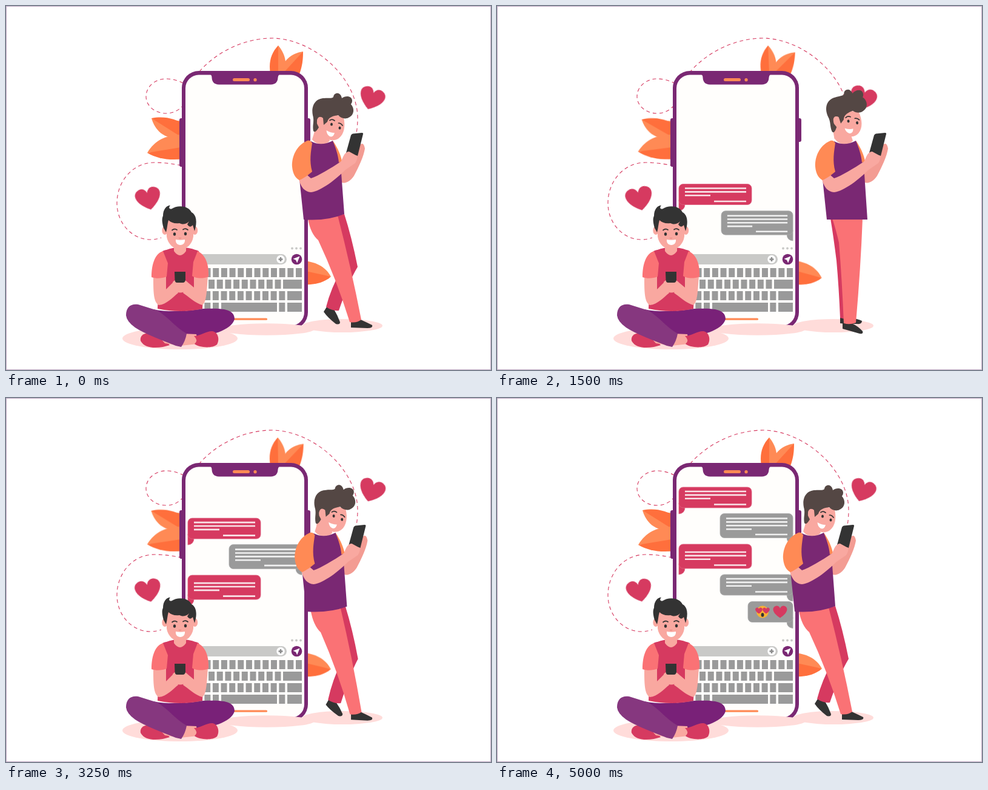
Write an HTML page that moves like this. It is 800 px wide and 600 px high and loops after 5.04 s.

```html
<!DOCTYPE html>
<html lang="en">
<head>
<meta charset="utf-8">
<title>Chat</title>
<style>
html, body { margin: 0; width: 100%; height: 100%; overflow: hidden; background: #fff; }
svg { display: block; width: 800px; height: 600px; }
.purple { fill: #7a2873; } .plum { fill: #86377f; } .crimson { fill: #d63a60; }
.coral { fill: #fa7275; } .skin { fill: #f9a8a0; } .shade { fill: #f39c93; }
.light { fill: #ff8a55; } .deep { fill: #ff6f3c; } .dark { fill: #333; }
.curls { fill: #544744; } .grey { fill: #9a9a9a; } .white { fill: #fff; } .floor { fill: #ffdcda; }
.line { fill: none; stroke: #333; stroke-width: 1.7; stroke-linecap: round; }
.dash { fill: none; stroke: #d63a60; stroke-width: 1.1; stroke-dasharray: 6 5; animation: flow 5.04s linear infinite; }
@keyframes flow { to { stroke-dashoffset: -66; } }
.leaf { animation: sway .504s ease-in-out infinite alternate; }
@keyframes sway { to { transform: rotate(var(--turn)); } }
.beat { animation: beat .42s cubic-bezier(.364, 0, .636, 1) infinite alternate; }
@keyframes beat { to { transform: scale(1.15); } }
.text { fill: none; stroke: #fff; stroke-opacity: .85; stroke-width: 2.6; }
</style>
</head>
<body>
<svg viewBox="0 0 800 600">
  <defs>
    <path id="heart" d="M0 18C-25 3-26-15-11-18C-5-19-1-14 0-10C1-14 5-19 11-18C26-15 25 3 0 18Z"/>
    <clipPath id="cut"><rect x="280" y="100" width="230" height="427"/></clipPath>
  </defs>
  <rect x=".5" y=".5" width="799" height="599" fill="#fff" stroke="#bda6c1"/>

  <g class="dash">
    <path d="M319 108C345 78 390 53 440 53C510 55 580 120 580 185C580 200 578 212 575 222"/>
    <path d="M292 127C283 122 272 120 264 120C246 120 231 133 231 149C231 165 246 177 264 177C275 177 283 173 290 166"/>
    <path d="M289 263C275 260 260 258 245 258C208 258 183 290 183 325C183 358 208 385 238 385C245 385 250 384 256 382"/>
  </g>

  <g class="leaf" style="--turn:-2.4deg; transform-origin:290px 218px">
    <path class="light" d="M240 185C246 205 260 221 294 219V190Z"/>
    <path class="deep" d="M240 185C262 181 280 186 294 196V219Z"/>
  </g>
  <g class="leaf" style="--turn:2deg; transform-origin:290px 230px">
    <path class="light" d="M233 242C245 222 262 212 294 212V236Z"/>
    <path class="deep" d="M233 242L294 232V252C270 255 250 252 233 242Z"/>
  </g>
  <g class="leaf" style="--turn:-2.4deg; transform-origin:448px 110px">
    <path class="deep" d="M449 65C437 78 433 92 436 112H452Z"/>
    <path class="light" d="M449 65C460 78 465 95 458 112H449Z"/>
  </g>
  <g class="leaf" style="--turn:2.8deg; transform-origin:466px 112px">
    <path class="light" d="M490 75C470 78 456 90 452 112H464Z"/>
    <path class="deep" d="M490 75C490 88 489 98 484 112H456Z"/>
  </g>
  <g class="leaf" style="--turn:3deg; transform-origin:495px 440px">
    <path class="deep" d="M490 431L536 446C525 456 510 460 490 459Z"/>
    <path class="light" d="M490 420C515 422 528 432 536 446L490 436Z"/>
  </g>

  <g clip-path="url(#cut)">
    <rect class="purple" x="286" y="185" width="10" height="80" rx="3"/>
    <rect class="purple" x="492" y="185" width="10" height="39" rx="3"/>
    <rect class="purple" x="290" y="107" width="208" height="426" rx="28"/>
    <rect x="296" y="113.500" width="196" height="413.500" rx="22" fill="#fffefc"/>
    <rect x="296" y="480" width="178" height="47" fill="#fffefc"/>
    <path class="purple" d="M335 112Q339.500 113 339.500 118Q340 129 351 129.500H437Q448 129 448.500 118Q449 113 453 112Z"/>
    <rect class="light" x="374" y="119" width="28" height="5" rx="2.500"/>
    <circle class="light" cx="411" cy="121.700" r="2.600"/>
  </g>
  <g fill="#c9c9c7">
    <circle cx="472" cy="399.500" r="1.900"/><circle cx="479" cy="399.500" r="1.900"/><circle cx="486" cy="399.500" r="1.900"/>
    <rect x="302" y="409" width="161" height="17" rx="8.500"/>
  </g>
  <circle class="white" cx="453" cy="417.500" r="6.700"/>
  <path d="M449.500 417.500h7M453 414v7" stroke="#8c8c8c" stroke-width="2.600"/>
  <circle class="purple" cx="479.500" cy="417.500" r="8.800"/>
  <path class="white" d="M484.500 412.500L473.500 416.800L478 418.800L480.200 423.500Z"/>
  <g id="keys" class="grey"></g>
  <rect class="light" x="350" y="514.500" width="81" height="3.300" rx="1.600"/>
  <g id="chat"></g>

  <g class="floor">
    <ellipse cx="430" cy="533" rx="78" ry="9.700"/>
    <ellipse cx="555" cy="527" rx="66" ry="11"/>
    <ellipse cx="287" cy="548" rx="95" ry="18"/>
  </g>

  <g transform="translate(603 153) rotate(19)"><use href="#heart" class="crimson beat"/></g>
  <g transform="translate(235 318) rotate(-13)"><use href="#heart" class="crimson beat"/></g>

  <!-- standing man -->
  <g id="legs"></g>
  <g id="upper">
    <path class="shade" d="M552 272L566 262L580 235C584 226 590 223 592 235C590 248 582 265 574 280C566 292 555 294 552 289Z"/>
    <path class="skin" d="M511 200L505 220C512 230 528 230 534 222L528 205Z"/>
    <path id="shirt" class="purple"/>
    <path class="light" d="M539 222C548 235 553 248 554 256L549 258C548 245 543 232 539 222Z"/>
    <path class="dark" d="M572 210.500L587 209Q589.500 209 589 211L580 247L561 242L569 213Q570 211 572 210.500Z"/>
    <path class="skin" d="M483 286C487 300 493 306 503 307C520 305 545 285 560 270L576 259C581 251 580 246 577 246L566 240C559 240 556 248 553 256C535 268 515 280 503 284L496 278Z"/>
    <path class="light" d="M497 222C478 230 471 250 472 265C473 277 478 284 484 287C492 284 500 277 505 273C500 255 503 240 505 226C503 222 500 221 497 222Z"/>
  </g>
  <g id="head">
    <path class="skin" d="M510 188L508 218C514 226 526 227 531 222L530 200Z"/>
    <path class="skin" d="M514 184L530 174L557 184C560 198 558 211 549 218C541 224 530 221 524 215L517 196Z"/>
    <path class="curls" d="M507 206C505 196 509 190 506 180C503 165 510 152 525 152C532 151 537 153 540 150C541 142 552 141 554 152C560 147 571 148 571 156C571 160 569 161 569 162C575 168 575 180 565 184C560 187 552 185 548 180C540 181 532 183 530 191L524 196L523 185C518 180 512 185 513 194L516 200C512 207 509 209 507 206Z"/>
    <ellipse class="skin" cx="518" cy="189.500" rx="5" ry="6.800"/>
    <g class="dark"><ellipse cx="537" cy="195" rx="2" ry="2.500"/><ellipse cx="550.500" cy="201" rx="2" ry="2.500"/></g>
    <path class="line" d="M534 188.500q4-3 8 .5M548.500 193q4 0 6.500 4"/>
    <path class="white" d="M528.500 205Q536 209.500 542 209Q540 217 534 215Q529 212 528.500 205Z"/>
  </g>

  <!-- sitting man -->
  <path class="crimson" d="M222 552C220 542 230 537 240 540L262 550L270 559C255 564 230 567 222 552Z"/>
  <path class="skin" d="M255 548L272 550L275 558L262 556Z"/>
  <path d="M243 500C270 506 310 502 325 499C345 499 377 496 377 516C372 535 335 544 312 546L262 553L245 530Z" fill="#792178"/>
  <g id="foot">
    <path class="skin" d="M290 540L314 541L316 557L288 560Z"/>
    <path class="crimson" d="M310 544C320 544 330 536 340 536C350 537 353 550 348 558C340 565 318 563 311 557Q318 551 310 544Z"/>
  </g>
  <path class="plum" d="M198 510C198 496 206 490 218 492L250 502C270 515 280 530 298 540Q296 552 289 562L280 560C255 550 228 540 213 530Q199 520 198 510Z"/>
  <path class="crimson" d="M258 404C270 400 276 398 288 398C300 398 308 400 318 404L327 440L324 499Q288 507 250 499L252 450Z"/>
  <path class="skin" d="M243 445C243 470 243 488 252 493C265 492 275 480 284 473L276 455L264 467V445ZM333 445C331 470 331 488 324 493C312 490 300 478 292 473L298 454L310 464V445Z"/>
  <path class="coral" d="M259 404C246 408 240 425 240 447C248 450 258 449 265 446L267 424ZM316 404C329 410 335 425 334 446C325 450 312 449 307 445L309 422Z"/>
  <path class="skin" d="M275 455Q280 449 287 452Q294 449 299 455L299 467Q288 478 275 467Z"/>
  <path class="dark" d="M278 438H296V452Q295 456 292 456H282Q279 456 278.500 452Z"/>
  <path class="skin" d="M277 388V404Q287 418 297 404V388Z"/>
  <g id="face">
    <g class="skin">
      <ellipse cx="262" cy="370" rx="4.700" ry="7"/><ellipse cx="311.500" cy="370" rx="4.700" ry="7"/>
      <path d="M265 352H309V380C307 393 298 401 287 401C277 401 267 393 265 380Z"/>
    </g>
    <path class="dark" d="M260 366C257 356 257 350 259 346C259 336 264 329 271 328.500C268 332 269 335 273 334.500C283 327.500 301 329 306 340C314 344 316 356 311 371L308 361C304 366 301 363 299 360L302 355C296 361 290 360 286 358C278 359 272 357 268 353C266 360 266 366 264 373Z"/>
    <g class="dark"><ellipse cx="278" cy="376" rx="2.200" ry="2.800"/><ellipse cx="296" cy="375.500" rx="2.200" ry="2.800"/></g>
    <path class="line" d="M274 369.500q4-3.500 8-.5M292 368.500q4-3 8 .5"/>
    <path d="M285 382q2 1.500 4 0" fill="none" stroke="#e98b85" stroke-width="1.300"/>
    <path id="smile" class="white" d="M-7.500-4.500Q0-3 7.500-4.500C8 1 5 4.500 0 4.500C-5 4.500-8 1-7.500-4.500Z"/>
  </g>
</svg>
<script>
const LOOP = 5040;
const NS = 'http://www.w3.org/2000/svg';
const $ = id => document.getElementById(id);

function add(parent, tag, attrs) {
  const el = document.createElementNS(NS, tag);
  for (const key in attrs) el.setAttribute(key, attrs[key]);
  return parent.appendChild(el);
}

const smooth = (t, from, to) => {
  const u = Math.min(1, Math.max(0, (t - from) / (to - from)));
  return u * u * (3 - 2 * u);
};

// Blend two paths that share the same commands.
function mix(a, b, p) {
  const ends = b.match(/[\d.]+/g);
  let i = 0;
  return a.replace(/[\d.]+/g, n => (+n + (ends[i++] - n) * p).toFixed(2));
}

// Keyboard
const key = (x, row, w) => add($('keys'), 'rect', { x, y: 432 + row * 19, width: w, height: 15 });
const keyRun = (x, row, count) => {
  for (let i = 0; i < count; i++) key(x - i * 13.68, row, 10);
};
keyRun(478, 0, 13);
keyRun(443.500, 1, 10); key(457, 1, 31);
keyRun(450.300, 2, 11); key(464, 2, 24);
keyRun(450.300, 3, 1); keyRun(341, 3, 3); key(355, 3, 92); key(464, 3, 24);

// Messages: final top, height, first text line, number of full lines, pop time
const messages = [
  { y: 147, h: 34, first: 7, full: 2, pop: 250, mine: false },
  { y: 190.500, h: 40, first: 8, full: 3, pop: 1224, mine: true },
  { y: 241, h: 40, first: 13, full: 2, pop: 2160, mine: false },
  { y: 291, h: 34, first: 7, full: 2, pop: 3340, mine: true },
  { y: 335.500, h: 34, emoji: true, pop: 4260, mine: true }
];
const lifts = [0, 50.500, 49.500, 49, 48];

for (const m of messages) {
  const w = m.emoji ? 74 : 120;
  const left = m.mine ? -w : 0;
  const top = -m.h - 10;
  m.el = add($('chat'), 'g', {});
  const body = add(m.el, 'g', {
    class: m.mine ? 'grey' : 'crimson', stroke: m.mine ? '#aaa' : '#df6380', 'stroke-width': 0.8
  });
  add(body, 'path', { d: m.mine ? 'M0-18V0Q-10-1-10-11V-18Z' : 'M0-18V0Q10-1 10-11V-18Z' });
  add(body, 'rect', { x: left, y: top, width: w, height: m.h, rx: 7 });
  if (m.emoji) {
    const mid = top + 17;
    const heart = (x, y, s) => add(m.el, 'use', {
      href: '#heart', class: 'crimson', transform: `translate(${x} ${y}) scale(${s})`
    });
    add(m.el, 'circle', { cx: -50, cy: mid, r: 10, fill: '#f8b133' });
    heart(-56, mid - 2, 0.28);
    heart(-44, mid - 2, 0.28);
    add(m.el, 'ellipse', { cx: -50, cy: mid + 5, rx: 2.4, ry: 3.2, class: 'dark' });
    heart(-21, mid, 0.55);
    continue;
  }
  const x = left + 10;
  let d = '';
  for (let i = 0; i <= m.full; i++) d += `M${x} ${top + m.first + i * 5.9}h${i < m.full ? 101 : 42}`;
  d += `M${x + 48} ${top + m.h - 5.5}h53`;
  add(m.el, 'path', { d, class: 'text' });
}

// Legs: leaning and upright shapes, back to front
const legs = [
  ['dark', 'M529 496L541 500Q547 510 551 521Q551 526 544 524Q530 513 524 504Z',
           'M566 514L580 514Q594 515 602 519Q602 525 594 524Q575 524 566 523Z'],
  ['crimson', 'M520 350L558 343Q570 380 580 430Q565 455 549 502Q538 503 528 496Q536 465 553 435Q545 400 520 350Z',
              'M550 350L580 350Q590 400 588 430Q588 470 588 515Q578 518 566 514Q564 465 560 420Q555 380 550 350Z'],
  ['dark', 'M569 519L585 517Q596 522 604 526Q606 531 596 531L569 530Z',
           'M570 523L585 523Q596 528 603 536Q605 541 598 540L570 532Z'],
  ['coral', 'M498 350Q502 375 515 386Q545 450 567 521Q578 523 586 517Q569 430 547 345Z',
            'M553 350Q560 372 564 390Q569 450 572 523Q582 526 592 522Q600 430 603 350Z']
].map(([cls, lean, stand]) => ({ el: add($('legs'), 'path', { class: cls }), lean, stand }));

const set = (id, transform) => $(id).setAttribute('transform', transform);

function drawChat(t) {
  let lift = 0;
  for (let i = messages.length - 1; i >= 0; i--) {
    const m = messages[i];
    const scale = smooth(t, m.pop, m.pop + 300);
    m.el.setAttribute('visibility', scale > 0 ? 'visible' : 'hidden');
    m.el.setAttribute('transform', `translate(${m.mine ? 488 : 300} ${m.y + m.h + 10 + lift}) scale(${scale})`);
    lift += lifts[i] * (1 - smooth(t, m.pop - 360, m.pop - 40));
  }
}

function drawStander(t) {
  const p = smooth(t, 290, 800) - smooth(t, 2815, 3345);
  for (const leg of legs) leg.el.setAttribute('d', mix(leg.lean, leg.stand, p));
  $('shirt').setAttribute('d', `M503 223Q520 232 539 222C546 235 552 250 552 262L558 ${343 + 9 * p}Q528 ${355 - 3 * p} 491 352L484 285C478 265 485 240 503 223Z`);
  set('upper', `translate(${53 * p} 0)`);
  set('head', `translate(${49 * p} ${-2.5 * p}) rotate(${-13 * p} 522 222)`);
}

function drawSitter(t) {
  const u = (t % 1680) / 1680;
  const down = smooth(u, 0.25, 0.32) - smooth(u, 0.56, 0.63);
  const tap = u > 0.22 && u < 0.62 ? Math.sin(Math.PI * (u - 0.22) / 0.4) ** 2 : 0;
  set('face', `rotate(${4 * down} 288 402)`);
  set('smile', `translate(${287.5 + down} ${389.5 + 1.5 * down}) scale(${1 - 0.4 * down} ${1 - 0.2 * down})`);
  set('foot', `rotate(${5 * tap} 296 550)`);
}

function frame() {
  const t = (document.timeline.currentTime ?? performance.now()) % LOOP;
  drawChat(t);
  drawStander(t);
  drawSitter(t);
  requestAnimationFrame(frame);
}
frame();
</script>
</body>
</html>
```
